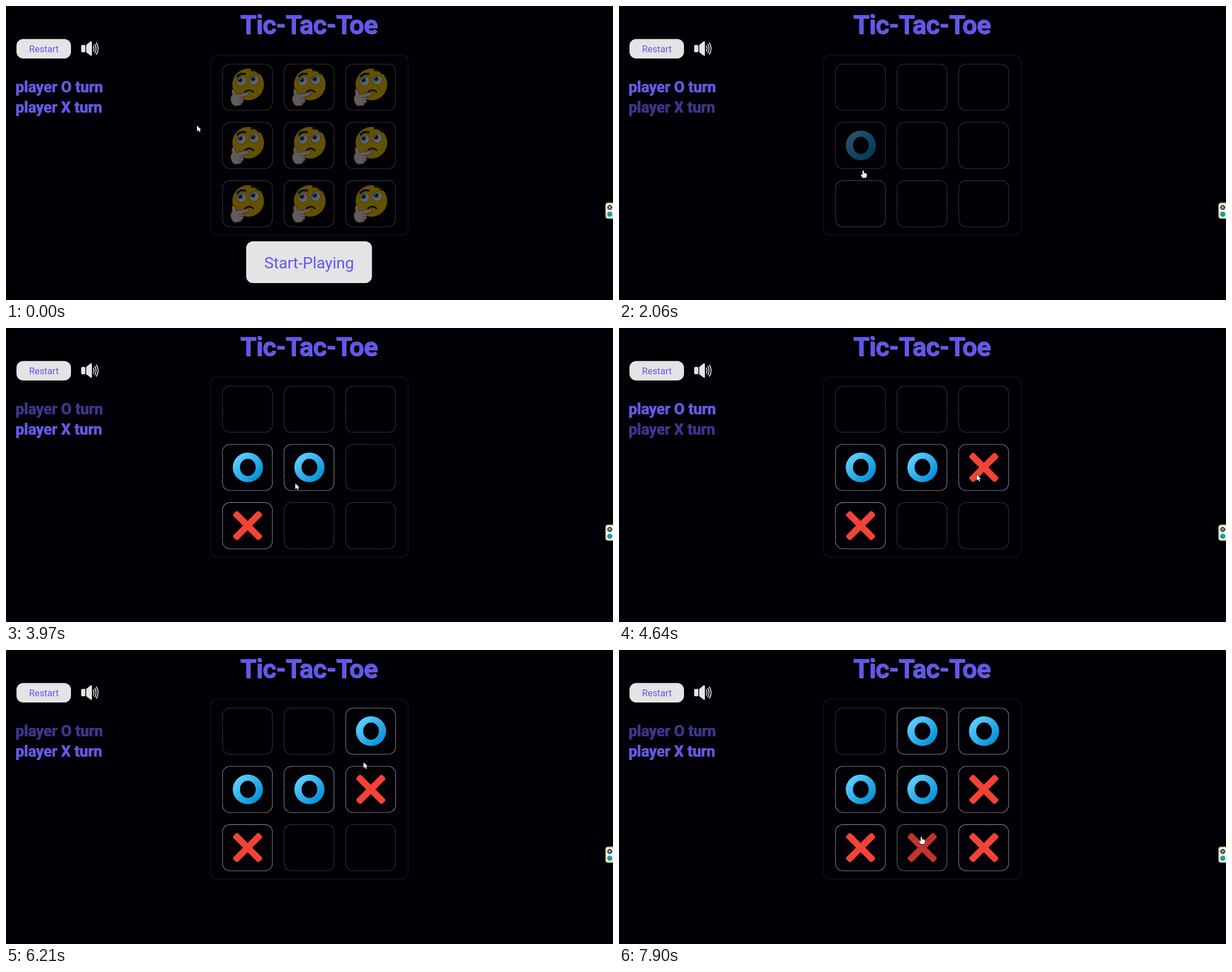
Write an HTML page with a canvas that moves like this. It is 1074 by 521 pixels and loops after 8000 ms.

```html
<!DOCTYPE html>
<html lang="en">
<head>
<meta charset="utf-8">
<title>Tic-Tac-Toe</title>
<style>
  html, body { margin: 0; width: 100%; height: 100%; overflow: hidden; background: #010006; }
  canvas { display: block; width: 1074px; height: 521px; }
</style>
</head>
<body>
<canvas id="stage" width="1074" height="521"></canvas>
<script>
const ctx = document.getElementById('stage').getContext('2d');
const LOOP = 8000, BG = '#010006', PURPLE = '#6156f0', LIGHT = '#e4e4e4';
const START = 1580, FADE = 150, IDLE = 0.4, HOVER = 0.8;

// pointer moves: from time, to time, end x, end y, optional control point
const moves = [
  [790, 1230, 477, 423, 345, 320],
  [1950, 2100, 423, 265],
  [2810, 3080, 419, 340],
  [3270, 3510, 508, 272],
  [3945, 4180, 633, 260, 565, 325],
  [5040, 5240, 630, 338],
  [5490, 5600, 640, 97],
  [5800, 5890, 634, 150],
  [6115, 6400, 629, 336],
  [6960, 7260, 537, 145],
  [7450, 7745, 535, 331]
];

// turns: cell, hover begins, press, release
const turns = [
  [3, 2060, 2500, 2600],
  [6, 2990, 3150, 3250],
  [4, 3450, 3620, 3770],
  [5, 4120, 4530, 4640],
  [2, 5810, 5950, 6040],
  [8, 6345, 6650, 6750],
  [1, 7200, 7330, 7420],
  [7, 7755, 9000, 9000]
].map(([cell, enter, press, done], i) => ({ cell, enter, press, done, mark: 'OX'[i % 2] }));

// cells passed over but not chosen
const visits = [
  { cell: 6, enter: 1993, leave: 2046, mark: 'O' },
  { cell: 8, enter: 5130, leave: 5495, mark: 'O' }
];

const clamp = v => Math.max(0, Math.min(1, v));
const ease = v => v * v * (3 - 2 * v);

function box(x, y, w, h, r) {
  ctx.beginPath();
  ctx.roundRect(x, y, w, h, r);
}

function disc(x, y, r, fill) {
  ctx.beginPath();
  ctx.arc(x, y, r, 0, Math.PI * 2);
  ctx.fillStyle = fill;
  ctx.fill();
}

function line(d, color, width) {
  ctx.strokeStyle = color;
  ctx.lineWidth = width;
  ctx.lineCap = ctx.lineJoin = 'round';
  ctx.stroke(new Path2D(d));
}

// dims an area by covering it with the background
function veil(x, y, w, h, amount) {
  ctx.globalAlpha = amount;
  ctx.fillStyle = BG;
  ctx.fillRect(x, y, w, h);
  ctx.globalAlpha = 1;
}

function label(str, x, y, font, color, align = 'left') {
  ctx.font = font + ' Roboto, "Liberation Sans", sans-serif';
  ctx.textAlign = align;
  ctx.fillStyle = color;
  ctx.fillText(str, x, y);
}

function glowLabel(str, x, y, font, align) {
  label(str, x + 0.7, y + 0.7, font, '#8a83cc', align);
  label(str, x, y, font, PURPLE, align);
}

function drawO() {
  const g = ctx.createLinearGradient(26, 24, 64, 62);
  g.addColorStop(0, '#5bcdff');
  g.addColorStop(1, '#0490d8');
  ctx.beginPath();
  ctx.ellipse(45.4, 41.2, 26.7, 26.3, 0, 0, Math.PI * 2);
  ctx.ellipse(45.4, 41.2, 13.9, 15.2, 0, 0, Math.PI * 2);
  ctx.fillStyle = g;
  ctx.fill('evenodd');
}

function drawX() {
  ctx.save();
  ctx.translate(45, 41.2);
  ctx.rotate(Math.PI / 4);
  ctx.beginPath();
  ctx.roundRect(-32.5, -5.8, 65, 11.6, 3.8);
  ctx.roundRect(-5.8, -32.5, 11.6, 65, 3.8);
  ctx.fillStyle = '#f44336';
  ctx.fill();
  ctx.restore();
}

const fist = new Path2D('M17 69 C13 61 16 57 18 55 L17 48 Q18 43 22 46 L25 54 ' +
  'L45 50 Q50 52 46 56 L36 59 Q40 61 37 64 Q39 68 35 69 Q34 74 27 74 Q20 76 17 69Z');

function drawFace() {
  disc(46, 36.5, 28, '#f8cc00');
  for (const [x, y] of [[34, 30.5], [56.5, 28.5]]) {
    disc(x, y, 9, '#8f7c48');
    disc(x, y, 8.2, '#f3f3fa');
    disc(x - 2, y - 2, 4.6, '#4d8ea0');
    disc(x - 2, y - 2, 2.6, '#0c1c24');
    disc(x - 3.3, y - 3.6, 1.2, '#ffffff');
  }
  line('M27 22 Q32 16 41 18', '#321c00', 3.6);
  line('M52 11 Q60 10 65 17', '#321c00', 3.6);
  line('M40 50 Q48 43 55 50', '#321c00', 2.8);
  ctx.fillStyle = '#eee7e6';
  ctx.fill(fist);
  ctx.strokeStyle = '#c06c3c';
  ctx.lineWidth = 1.1;
  ctx.stroke(fist);
  line('M29 60 L36 59 M31 64 L37 64 M30 69 L35 69', '#c06c3c', 0.9);
}

function cellState(i, t) {
  if (t < START) return { mark: 'face', alpha: IDLE };
  const rise = enter => IDLE + (HOVER - IDLE) * clamp((t - enter) / FADE);

  const turn = turns.find(s => s.cell === i && t >= s.enter);
  if (turn) return { mark: turn.mark, alpha: t >= turn.done ? 1 : rise(turn.enter) };

  const visit = visits.find(v => v.cell === i && t >= v.enter);
  if (!visit) return { mark: '', alpha: IDLE };
  if (t < visit.leave) return { mark: visit.mark, alpha: rise(visit.enter) };
  const peak = clamp((visit.leave - visit.enter) / FADE);
  const left = clamp(peak - (t - visit.leave) / FADE);
  return { mark: '', alpha: IDLE + (HOVER - IDLE) * left };
}

function drawCell(i, t) {
  const { mark, alpha } = cellState(i, t);
  ctx.save();
  ctx.translate(382.5 + 109 * (i % 3), 102.6 + 103.2 * Math.floor(i / 3));
  box(0.6, 0.4, 88.2, 81.8, 13);
  ctx.strokeStyle = '#fff';
  ctx.lineWidth = 1.1;
  ctx.lineCap = 'butt';
  ctx.setLineDash([1.2, 1.2]);
  ctx.stroke();
  ctx.setLineDash([]);
  if (mark === 'O') drawO();
  if (mark === 'X') drawX();
  if (mark === 'face') drawFace();
  veil(-2, -2, 94, 88, 1 - alpha);
  ctx.restore();
}

function drawSpeaker() {
  ctx.fillStyle = LIGHT;
  box(133, 69, 7.5, 13, 2);
  ctx.fill();
  ctx.fill(new Path2D('M142 69 L150 62.5 Q152 62 152 64 V87 Q152 89 150 88 L142 82Z'));
  line('M154.5 71 Q157 75.5 154.5 80', LIGHT, 1.7);
  line('M157.3 68 Q161.5 75.5 157.3 83', LIGHT, 1.7);
  line('M160 65.5 Q166 75.5 160 85.5', LIGHT, 1.7);
}

function drawWidget() {
  box(1061, 349, 20, 27.5, 4);
  ctx.fillStyle = '#edf3ea';
  ctx.fill();
  ctx.strokeStyle = '#8cb648';
  ctx.lineWidth = 1.3;
  ctx.stroke();
  disc(1068.3, 357, 4.3, '#222');
  line('M1066.5 355.2 l3.6 3.6 m0 -3.6 l-3.6 3.6', '#fff', 1.2);
  disc(1068.3, 369, 4.6, '#2298a8');
}

function drawStart(t) {
  box(425, 417, 222.5, 74, 12);
  ctx.fillStyle = LIGHT;
  ctx.fill();
  label('Start-Playing', 536.3, 465, '28px', PURPLE, 'center');
  veil(424, 416, 225, 76, 0.2 * clamp((t - 1190) / 110));
}

function drawPlayer(name, y, active) {
  glowLabel(`player ${name} turn`, 16.5, y, '700 26.8px', 'left');
  if (!active) veil(14, y - 22, 162, 31, 0.4);
}

function pointerAt(t) {
  let x = 338, y = 212;
  for (const [a, b, ex, ey, cx = (x + ex) / 2, cy = (y + ey) / 2] of moves) {
    if (t < a) break;
    const k = ease(clamp((t - a) / (b - a))), m = 1 - k;
    x = m * m * x + 2 * m * k * cx + k * k * ex;
    y = m * m * y + 2 * m * k * cy + k * k * ey;
  }
  return [x, y];
}

const arrow = new Path2D('M0 0 V10 L2.4 7.8 L4.2 11.4 L5.9 10.6 L4.2 7.2 H7.3Z');
const hand = new Path2D('M-1.2 0.8 Q0 -0.8 1 0.8 V4.6 Q2.4 3.8 3 5 Q4.3 4.3 4.8 5.6 ' +
  'Q6.3 5.2 6.3 7 V9.5 L5 13 H-1 L-4 8.6 Q-4.2 6.8 -2.6 7.3 L-1.2 8.4Z');

function drawPointer(t) {
  const [x, y] = pointerAt(t);
  const pressed = (t >= 1470 && t < START) || turns.some(s => t >= s.press && t < s.done);
  if (pressed) disc(x, y + 1, 7, 'rgba(224,218,48,0.9)');
  const over = turns.some(s => t >= s.enter && t < s.done) ||
    visits.some(v => t >= v.enter && t < v.leave);
  const shape = over ? hand : arrow;
  ctx.save();
  ctx.translate(x, y);
  ctx.lineJoin = 'round';
  ctx.strokeStyle = '#111';
  ctx.lineWidth = 1.3;
  ctx.stroke(shape);
  ctx.fillStyle = '#fff';
  ctx.fill(shape);
  ctx.restore();
}

function draw(t) {
  ctx.fillStyle = BG;
  ctx.fillRect(0, 0, 1074, 521);

  ctx.letterSpacing = '-1px';
  glowLabel('Tic-Tac-Toe', 535.5, 49.3, '700 47px', 'center');
  ctx.letterSpacing = '0px';

  box(18.5, 58.5, 96.5, 34.5, 12);
  ctx.fillStyle = LIGHT;
  ctx.fill();
  label('Restart', 67, 81.5, '16.3px', PURPLE, 'center');
  drawSpeaker();

  const playing = t >= START;
  const turnO = turns.filter(s => t >= s.done).length % 2 === 0;
  drawPlayer('O', 152.5, !playing || turnO);
  drawPlayer('X', 188.5, !playing || !turnO);

  box(361.5, 87.5, 350, 318.5, 12);
  ctx.strokeStyle = '#0c0c12';
  ctx.lineWidth = 2.6;
  ctx.stroke();
  for (let i = 0; i < 9; i++) drawCell(i, t);

  if (!playing) drawStart(t);
  drawWidget();
  drawPointer(t);
}

const begin = performance.now();
function tick() {
  draw((performance.now() - begin) % LOOP);
  requestAnimationFrame(tick);
}
tick();
</script>
</body>
</html>
```
